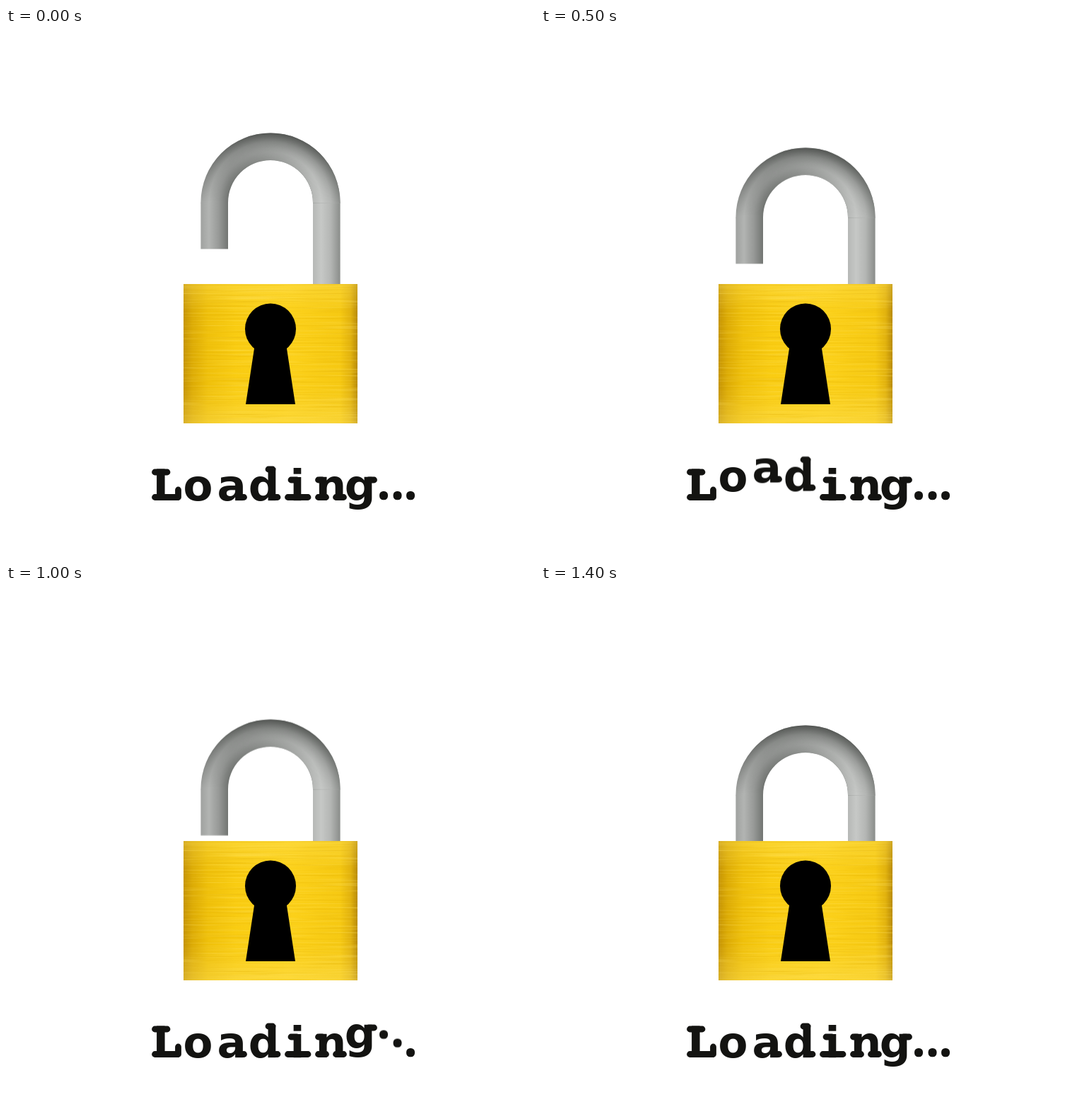
Animation, 748 px wide and 748 px high, one loop 1500 ms. Source, as an HTML page without scripts:

```html
<!DOCTYPE html>
<html lang="en">
<head>
<meta charset="utf-8">
<title>Loading</title>
<style>
  html, body { margin: 0; width: 100%; height: 100%; overflow: hidden; background: #fff; }
  svg { display: block; width: 100%; height: 100%; }

  .shackle { animation: close 1500ms -1ms infinite; }
  @keyframes close {
    0% { transform: translateY(0); animation-timing-function: steps(12, end); }
    80%, 100% { transform: translateY(50px); }
  }

  .word {
    font: bold 61px "DejaVu Sans", sans-serif;
    text-anchor: middle;
    fill: #131311;
    stroke: #131311;
    stroke-width: 0;
    stroke-linejoin: round;
    stroke-linecap: round;
  }
  .word path { fill: none; stroke-width: 8.8; }
  .word .dot { font-size: 8px; stroke-width: 10.5; }
  .word g { animation: hop 1500ms calc(var(--i) * 100ms - 1ms) step-end infinite; }
  @keyframes hop {
    0% { transform: none; }
    13.33% { transform: translateY(-13.5px); }
    20% { transform: translateY(-25.5px); }
    26.66% { transform: translateY(-13px); }
    33.33%, 100% { transform: none; }
  }
</style>
</head>
<body>
<svg viewBox="0 0 748 748" role="img" aria-label="Padlock closing">
  <defs>
    <linearGradient id="brass">
      <stop offset="0" stop-color="#c59406"/>
      <stop offset=".05" stop-color="#dcab06"/>
      <stop offset=".14" stop-color="#efc00b"/>
      <stop offset=".3" stop-color="#f9cc12"/>
      <stop offset=".6" stop-color="#fcd11a"/>
      <stop offset=".9" stop-color="#f6c913"/>
      <stop offset=".96" stop-color="#e2b30f"/>
      <stop offset="1" stop-color="#b88b08"/>
    </linearGradient>
    <linearGradient id="shine" x2="0" y2="1">
      <stop offset="0" stop-color="#ffe873" stop-opacity=".3"/>
      <stop offset=".2" stop-color="#ffe873" stop-opacity="0"/>
      <stop offset=".75" stop-color="#ffe873" stop-opacity="0"/>
      <stop offset="1" stop-color="#ffe873" stop-opacity=".35"/>
    </linearGradient>

    <!-- long horizontal streaks, light over dark -->
    <filter id="brushed" x="0" y="0" width="1" height="1" color-interpolation-filters="sRGB">
      <feTurbulence type="fractalNoise" baseFrequency=".007 .4" numOctaves="3" seed="4" result="noise"/>
      <feColorMatrix in="noise" values="0 0 0 0 .86  0 0 0 0 .66  0 0 0 0 0  0 2.2 0 0 -1.1" result="dark"/>
      <feColorMatrix in="noise" values="0 0 0 0 1  0 0 0 0 .9  0 0 0 0 .42  2.4 0 0 0 -1.2" result="light"/>
      <feMerge>
        <feMergeNode in="dark"/>
        <feMergeNode in="light"/>
      </feMerge>
    </filter>

    <linearGradient id="legLeft">
      <stop offset="0" stop-color="#a0a2a0"/>
      <stop offset=".3" stop-color="#b2b4b2"/>
      <stop offset=".65" stop-color="#989a98"/>
      <stop offset="1" stop-color="#727572"/>
    </linearGradient>
    <linearGradient id="legRight">
      <stop offset="0" stop-color="#b6b8b6"/>
      <stop offset=".3" stop-color="#c6c8c6"/>
      <stop offset=".65" stop-color="#b4b6b4"/>
      <stop offset="1" stop-color="#8a8d8a"/>
    </linearGradient>
    <!-- the arch carries both leg profiles around the bend -->
    <radialGradient id="archLeft" gradientUnits="userSpaceOnUse" cx="374" cy="247" r="98.6">
      <stop offset=".61" stop-color="#727572"/>
      <stop offset=".745" stop-color="#989a98"/>
      <stop offset=".88" stop-color="#b2b4b2"/>
      <stop offset="1" stop-color="#a0a2a0"/>
    </radialGradient>
    <radialGradient id="archRight" gradientUnits="userSpaceOnUse" cx="374" cy="247" r="98.6">
      <stop offset=".61" stop-color="#b6b8b6"/>
      <stop offset=".725" stop-color="#c6c8c6"/>
      <stop offset=".865" stop-color="#b4b6b4"/>
      <stop offset="1" stop-color="#8a8d8a"/>
    </radialGradient>
    <radialGradient id="archShade" gradientUnits="userSpaceOnUse" cx="374" cy="247" r="98.6">
      <stop offset=".61" stop-color="#303330" stop-opacity=".05"/>
      <stop offset=".78" stop-color="#303330" stop-opacity=".25"/>
      <stop offset="1" stop-color="#303330" stop-opacity=".65"/>
    </radialGradient>
    <linearGradient id="fadeX" gradientUnits="userSpaceOnUse" x1="314" y1="0" x2="434" y2="0">
      <stop offset="0" stop-color="#000"/>
      <stop offset="1" stop-color="#fff"/>
    </linearGradient>
    <linearGradient id="fadeY" gradientUnits="userSpaceOnUse" x1="0" y1="148" x2="0" y2="245">
      <stop offset="0" stop-color="#fff"/>
      <stop offset="1" stop-color="#000"/>
    </linearGradient>
    <mask id="toRight" maskUnits="userSpaceOnUse" x="270" y="140" width="210" height="115">
      <rect x="270" y="140" width="210" height="115" fill="url(#fadeX)"/>
    </mask>
    <mask id="toTop" maskUnits="userSpaceOnUse" x="270" y="140" width="210" height="115">
      <rect x="270" y="140" width="210" height="115" fill="url(#fadeY)"/>
    </mask>
    <path id="arch" d="M275.400 247.500V247a98.600 98.600 0 0 1 197.200 0v.5H434V247a60 60 0 0 0-120 0v.5z"/>
  </defs>

  <rect width="748" height="748" fill="#fff"/>

  <g class="shackle">
    <path d="M275.400 247H314v65.400h-38.600z" fill="url(#legLeft)"/>
    <path d="M434 247h38.600v120H434z" fill="url(#legRight)"/>
    <use href="#arch" fill="url(#archLeft)"/>
    <use href="#arch" fill="url(#archRight)" mask="url(#toRight)"/>
    <use href="#arch" fill="url(#archShade)" mask="url(#toTop)"/>
  </g>

  <rect x="251" y="362" width="246" height="197" fill="url(#brass)"/>
  <rect x="251" y="362" width="246" height="197" fill="url(#shine)"/>
  <rect x="251" y="362" width="246" height="197" filter="url(#brushed)" opacity=".4"/>
  <circle cx="374" cy="425.500" r="36"/>
  <path d="M351.500 450h45L409 532h-70z"/>

  <!-- each letter is text with slab serifs added -->
  <g class="word">
    <g style="--i:0"><text x="227" y="668">L</text><path d="M210.500 628H228M210.500 663.500H243.500V653"/></g>
    <g style="--i:1"><text x="271.500" y="668">o</text></g>
    <g style="--i:2"><text x="319" y="668">a</text><path d="M330 663.500H336.500"/></g>
    <g style="--i:3"><text x="364.500" y="668">d</text><path d="M371 624H377M376 663.500H384"/></g>
    <g style="--i:4"><text x="412" y="668">i</text><path d="M403 639H411M398.500 663.500H427"/></g>
    <g style="--i:5"><text x="459.500" y="668">n</text><path d="M441.500 639H447M441.500 663.500H452.500M466.500 663.500H477.500"/></g>
    <g style="--i:6"><text x="500.500" y="668">g</text><path d="M513 639H520.500"/></g>
    <g class="dot" style="--i:7"><text x="534" y="662">.</text></g>
    <g class="dot" style="--i:8"><text x="553.500" y="662">.</text></g>
    <g class="dot" style="--i:9"><text x="572" y="662">.</text></g>
  </g>
</svg>
</body>
</html>
```
